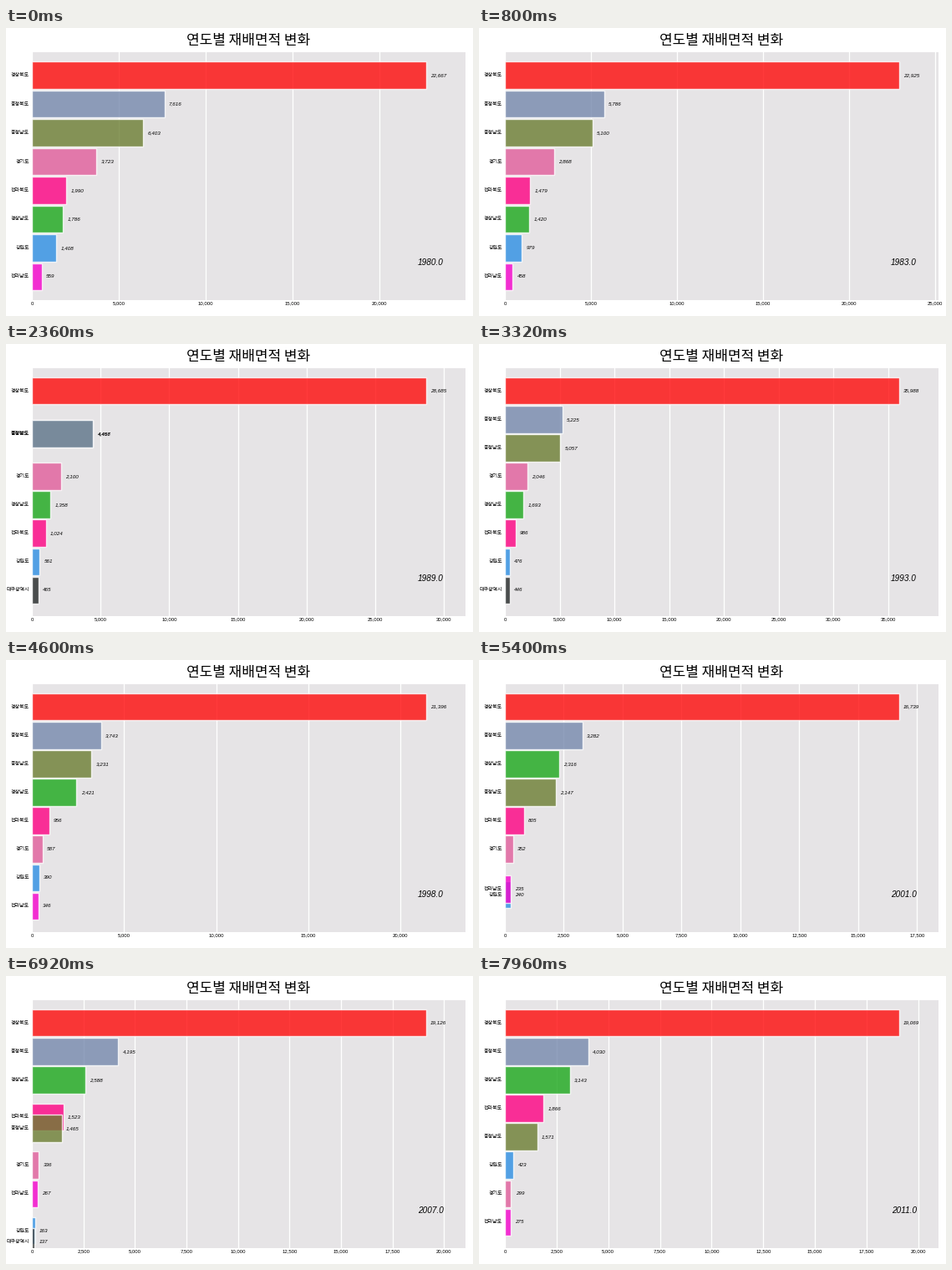
A matplotlib script for the animation above (8 s loop, 559x345 px).

```python
import numpy as np
import matplotlib.pyplot as plt
from matplotlib.animation import FuncAnimation
from matplotlib.ticker import MaxNLocator, StrMethodFormatter

W, H, DPI = 559, 345, 100
FRAMES, INTERVAL = 200, 40
STEPS_PER_FRAME, STEPS_PER_YEAR = 1.6, 10
START, FIRST_ENTRY, TOP = 1980, 1985, 8
LEFT, UPPER, AX_W, AX_H = 31, 29, 519, 296.5
BAR_HEIGHT = 0.95

plt.rcParams["font.family"] = ["Noto Sans CJK JP", "DejaVu Sans"]
DIGITS = dict(family="Liberation Sans", style="italic")


def px(size):
    """Pixels to points."""
    return size * 72 / DPI


# Region: colour, area in each key year, then any short dip as (year, area).
KEYS = [1980, 1986.3, 1993.3, 1998.4, 2001.6, 2007.7, 2011.9]
REGIONS = {
    "강원도": ("#2d8fe4", [1408, 638, 476, 390, 240, 163, 423], (2007, 138)),
    "경기도": ("#e15d9b", [3723, 2146, 2046, 587, 352, 336, 299]),
    "경상남도": ("#1ba81b", [1786, 1105, 1693, 2421, 2316, 2588, 3143]),
    "경상북도": ("#ff0a0a", [22667, 23177, 35988, 21396, 16739, 19126, 19069]),
    "대구광역시": ("#232727", [0, 481, 446, 230, 190, 137, 120]),
    "전라남도": ("#f600cc", [559, 370, 330, 346, 235, 267, 275]),
    "전라북도": ("#ff0082", [1990, 1056, 986, 956, 805, 1523, 1866]),
    "충청남도": ("#6c7e32", [6403, 3979, 5057, 3231, 2147, 1465, 1571]),
    "충청북도": ("#7689ad", [7616, 4252, 5225, 3743, 3282, 4195, 4030], (1987, 4000)),
}


def areas(t):
    """Area of every region at time t, blended between key years by square root."""
    result = []
    for _, values, *dips in REGIONS.values():
        years, points = zip(*sorted([*zip(KEYS, values), *dips]))
        result.append(np.interp(t, years, np.sqrt(points)) ** 2)
    return np.array(result)


def places(year):
    """Bar position of each region in a whole year: TOP is the largest."""
    return TOP - np.argsort(np.argsort(-areas(year)))


fig = plt.figure(figsize=(W / DPI, H / DPI), dpi=DPI, facecolor="white")
ax = fig.add_axes([LEFT / W, 1 - (UPPER + AX_H) / H, AX_W / W, AX_H / H],
                  facecolor="#e6e4e6")
ax.set_axisbelow(True)
ax.grid(axis="x", color="white", lw=px(1.3))
ax.set_yticks([])
ax.tick_params(length=0, pad=px(2), labelsize=px(6), labelcolor="black",
               labelfontfamily=DIGITS["family"])
ax.xaxis.set_major_locator(MaxNLocator(9, steps=[1, 2, 2.5, 5, 10]))
ax.xaxis.set_major_formatter(StrMethodFormatter("{x:,.0f}"))
for spine in ax.spines.values():
    spine.set_visible(False)

fig.text(290.5 / W, 1 - 13 / H, "연도별 재배면적 변화", fontsize=px(17),
         ha="center", va="center_baseline")
period = ax.text(0.95, 0.15, "", transform=ax.transAxes, fontsize=px(10),
                 ha="right", va="center", **DIGITS)

bars = ax.barh(range(len(REGIONS)), 1, BAR_HEIGHT, alpha=0.8, edgecolor="white",
               lw=px(1.4), color=[c for c, *_ in REGIONS.values()])
side = ax.get_yaxis_transform()
labels = [ax.text(-3 / AX_W, 0, name, transform=side, fontsize=px(6),
                  ha="right", va="center") for name in REGIONS]
counts = [ax.text(0, 0, "", fontsize=px(6.3), va="center", **DIGITS)
          for _ in REGIONS]


def draw(frame):
    step = round(frame * STEPS_PER_FRAME + 0.2)
    whole, part = divmod(step, STEPS_PER_YEAR)
    year, mix = START + whole, part / STEPS_PER_YEAR
    values = areas(year + mix)
    pos = places(year) * (1 - mix) + places(year + 1) * mix

    right = values.max() * 1.1
    ax.set_xlim(0, right)
    # The first bar to slide in stretches the axis a little.
    ax.set_ylim(0.1 if year + mix > FIRST_ENTRY else 0.2, TOP + 0.8)
    period.set_text(f"{year:.1f}")

    for bar, label, count, v, y in zip(bars, labels, counts, values, pos):
        for artist in (bar, label, count):
            artist.set_visible(y > 0.01)
        bar.set_width(v)
        bar.set_y(y - BAR_HEIGHT / 2)
        label.set_y(y)
        count.set_position((v + right * 0.01, y))
        count.set_text(f"{v:,.0f}")
    return []


anim = FuncAnimation(fig, draw, frames=FRAMES, interval=INTERVAL,
                     init_func=lambda: draw(0), repeat=True, repeat_delay=0)
plt.show()
```
